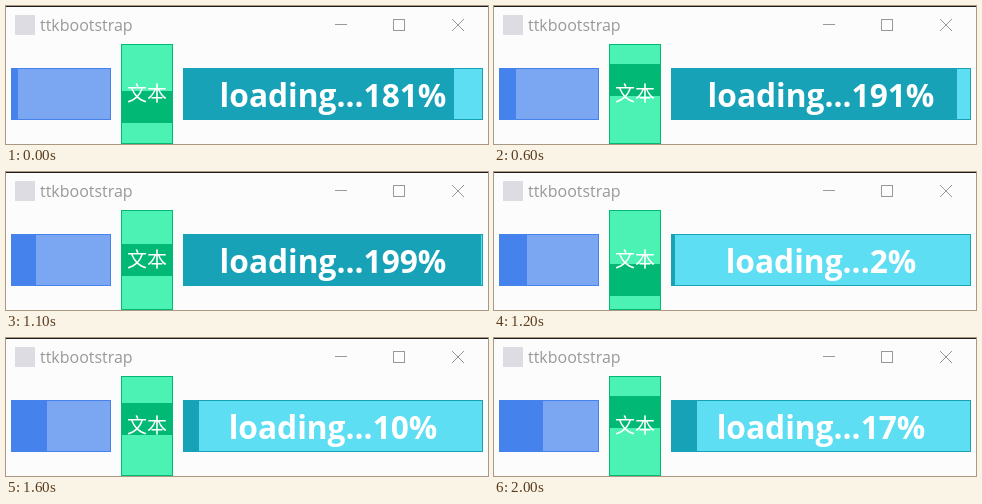
Animation, 482 px wide and 138 px high, one loop 2.1 s. Source, as an HTML page with a canvas:

```html
<!DOCTYPE html>
<html lang="zh-CN">
<head>
<meta charset="utf-8">
<title>ttkbootstrap</title>
<style>
html, body { margin: 0; width: 100%; height: 100%; overflow: hidden; background: #fcfcfc; }
canvas { display: block; }
</style>
</head>
<body>
<canvas id="stage" width="482" height="138"></canvas>
<script>
const ctx = document.getElementById('stage').getContext('2d');
const LOOP = 2100, TICK = 100;
const GREY = '#999999';
const BLUE = { fill: '#4582ec', trough: '#7aa6f2' };
const GREEN = { fill: '#02b875', trough: '#4bf2b4' };
const TEAL = { fill: '#17a2b8', trough: '#5edef2' };

// All gauges share one step counter, which advances unevenly per tick.
const STEPS = [0, 1, 2, 4, 6, 8, 10, 11, 13, 15, 16, 18, 21, 23, 24, 26, 29, 31, 32, 34, 36];

function rect(x, y, w, h, color) {
  ctx.fillStyle = color;
  ctx.fillRect(x, y, w, h);
}

function text(str, x, y, font, color, align) {
  ctx.font = font;
  ctx.fillStyle = color;
  ctx.textAlign = align;
  ctx.fillText(str, x, y);
}

function trough(x, y, w, h, colors) {
  rect(x, y, w, h, colors.fill);
  rect(x + 1, y + 1, w - 2, h - 2, colors.trough);
}

function titleBar() {
  rect(0, 0, 482, 138, '#fcfcfc');
  rect(0, 0, 482, 1, '#1c1c1c');
  rect(9, 9, 20, 20, '#dcdce2');
  text('ttkbootstrap', 34, 25, '16px "Open Sans", "Noto Sans", sans-serif', GREY, 'left');
  rect(329, 18, 12, 1, GREY);
  ctx.strokeStyle = GREY;
  ctx.lineWidth = 1;
  ctx.strokeRect(387.5, 13.5, 11, 11);
  ctx.beginPath();
  ctx.moveTo(446, 13);
  ctx.lineTo(458, 25);
  ctx.moveTo(458, 13);
  ctx.lineTo(446, 25);
  ctx.stroke();
}

function blueGauge(n) {
  trough(5, 62, 100, 52, BLUE);
  const end = Math.round(11.5 + n * 37 / 36);
  rect(6, 63, end - 6, 50, BLUE.fill);
}

function greenGauge(n) {
  trough(115, 38, 52, 100, GREEN);
  const phase = (n + 17) % 20;
  const level = phase <= 10 ? phase : 20 - phase;
  const top = Math.min(105, Math.max(39, Math.round(105.6 - 6.8 * level)));
  rect(116, top, 50, 32, GREEN.fill);
  text('文本', 141, 95, '20px "Noto Sans CJK SC", "Noto Sans CJK", sans-serif', '#fff', 'center');
}

function tealGauge(n) {
  trough(177, 62, 300, 52, TEAL);
  const value = (181 + n) % 200;
  const end = Math.round(178 + 298 * value / 200);
  rect(178, 63, end - 178, 50, TEAL.fill);
  text(`loading...${value}%`, 327, 101, 'bold 31.7px "Open Sans", "Noto Sans", sans-serif', '#fff', 'center');
}

function draw(ms) {
  const n = STEPS[Math.floor(ms % LOOP / TICK)];
  titleBar();
  blueGauge(n);
  greenGauge(n);
  tealGauge(n);
}

const start = performance.now();
function loop() {
  draw(performance.now() - start);
  requestAnimationFrame(loop);
}
loop();
</script>
</body>
</html>
```
